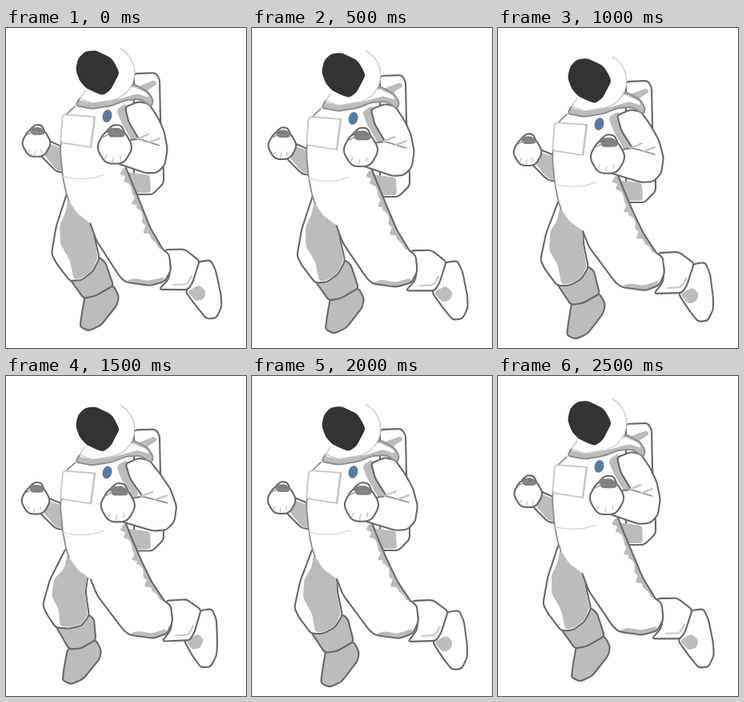
Animation, 300 px wide and 400 px high, one loop 3 s. Source, as an HTML page:

```html
<!DOCTYPE html>
<html lang="en">
<head>
<meta charset="utf-8">
<title>Running astronaut</title>
<style>
  html, body { margin: 0; width: 100%; height: 100%; overflow: hidden; background: #fff; }
  svg { display: block; width: 100%; height: 100%; }
  path { stroke-linejoin: round; stroke-linecap: round; }
</style>
</head>
<body>
<svg id="stage" viewBox="0 0 300 400"></svg>
<script>
const STEP = 500, REST = 2;
const WHITE = '#fff', SHADE = '#bcbcbc', INK = '#686868', SOFT = '#c6c6c6', MID = '#8c8c8c';

// The body sinks along an S-curve; the limbs swing with a late cubic.
const sink = k => 1 / (1 + Math.exp(-3.8 * (k - 1.25)));
const swing = k => (k / 3) ** 3;

const joint = (x, y, sinkX, sinkY, swingX = 0, swingY = 0) => ({ x, y, sinkX, sinkY, swingX, swingY });
const chest = joint(90, 140, 0, 10.6);
const hipL = joint(85, 232, 0, 10.6);
const hipR = joint(160, 210, 0, 10.6);
const shoulder = joint(165, 108, 0, 10.6);
const elbow = joint(207, 172, 3, 12, 9);
const fistL = joint(37, 155, -1, 12);
const fistR = joint(137, 161, 0, 13, 4);
const kneeL = joint(53, 290, -1, 10, -10, -6);
const cuffL = joint(74, 321, -1, 10, -17, -12);
const ankleL = joint(127, 333, -1, 12, -21, -4);
const toeL = joint(96, 389, 0, 13, -22, -6);
const innerL = joint(112, 296, 0, 12, -13);
const thighR = joint(170, 326, 5, 7, 0, -1);
const kneeR = joint(208, 297, 2, 4);
const ankleR = joint(245, 295, 4, 4, -2, -3);
const toeR = joint(260, 366, 2, 5, -9, -4);

const trunk = [chest, hipL, hipR, thighR, kneeR];
const thigh = [hipL, kneeL, innerL, cuffL];
const shin = [innerL, cuffL, ankleL];
const footL = [ankleL, toeL];
const shank = [kneeR, thighR, ankleR];
const footR = [ankleR, toeR];
const armL = [fistL, chest];
const armR = [shoulder, elbow, fistR];
const torso = [chest];

const P = text => text.split(' ').map(p => p.split(',').map(Number));

function oval(cx, cy, rx, ry, tilt = 0, from = 0, to = 360, bump = 0) {
  const pts = [], c = Math.cos(tilt), s = Math.sin(tilt);
  for (let deg = from; deg <= to - (to - from === 360 ? 15 : 0); deg += 15) {
    const a = deg * Math.PI / 180, r = 1 + bump * Math.cos(6 * a);
    const x = rx * r * Math.cos(a), y = ry * r * Math.sin(a);
    pts.push([cx + x * c - y * s, cy + x * s + y * c]);
  }
  return pts;
}

// Jagged cloth shadow on the inner side of an edge.
function creases(edge, depth) {
  const inner = [];
  for (let i = 0; i < edge.length - 1; i++) {
    const [a, b] = [edge[i], edge[i + 1]];
    const dx = b[0] - a[0], dy = b[1] - a[1], len = Math.hypot(dx, dy);
    for (let t = 0; t < 1; t += 5 / len) {
      const d = inner.length % 2 ? depth * (0.8 + 0.5 * Math.sin(inner.length * 2.3)) : depth * 0.45;
      inner.push([a[0] + dx * t - dy / len * d, a[1] + dy * t + dx / len * d]);
    }
  }
  return [...edge, ...inner.reverse()];
}

const parts = [];
function add(rig, pts, fill, stroke = 'none', width = 0, open = false) {
  const el = document.createElementNS('http://www.w3.org/2000/svg', 'path');
  el.setAttribute('fill', fill);
  el.setAttribute('stroke', stroke);
  el.setAttribute('stroke-width', width);
  stage.appendChild(el);
  parts.push({ el, rig, open, pts: typeof pts === 'string' ? P(pts) : pts });
}
const solid = (rig, pts, fill = WHITE) => add(rig, pts, fill, INK, 2.1);
const shade = (rig, pts, fill = SHADE) => add(rig, pts, fill);
const line = (rig, pts, color = INK, width = 2.1) => add(rig, pts, 'none', color, width, true);

function fist(hand, s) {
  const { x, y } = hand, at = (u, v) => [x + u * s, y + v * s], rig = [hand];
  solid(rig, [at(-9, -16), at(-1, -23), at(7, -22), at(11, -13), at(8, -6), at(-8, -6)]);
  solid(rig, oval(x, y, 17 * s, 17.5 * s, 0, 0, 360, 0.03));
  shade(rig, [at(-8, -19), at(5, -20), at(11, -14), at(9, -10), at(-6, -10)], '#808080');
  line(rig, [at(-12, -10), at(-5, -14), at(9, -13)], MID, 1.3);
  for (let i = -1; i < 2; i++) line(rig, [at(i * 7 - 1, 10 - i * i * 2), at(i * 8 - 2, 15 - i * i * 3)], SOFT, 1.4);
}

// Backpack
solid(torso, '160,67 187,66 192,74 193,122 197,190 197,204 183,218 160,218');
shade(torso, '162,84 186,75 189,80 176,88 184,100 166,94');
shade(torso, '150,190 180,194 181,216 160,216');

// Far arm and leg
solid(armL, '48,150 70,159 76,192 62,190 42,170');
shade(armL, '52,155 70,161 72,190 62,188 47,170');
fist(fistL, 1);
solid(footL, '92,344 127,332 134,345 132,356 112,382 97,389 86,384 88,368', SHADE);
solid(shin, '74,320 113,298 120,304 127,332 106,344 91,346', SHADE);
solid(thigh, '76,215 60,257 53,290 59,302 74,322 89,322 104,314 113,299 107,270 106,250');
shade(thigh, '78,220 74,240 65,255 64,278 75,297 79,320 89,320 103,313 111,298 106,270 105,250');

// Near lower leg
solid(footR, '226,333 244,295 259,293 265,307 269,337 269,352 262,366 250,367 239,353');
shade(footR, '228,333 243,324 251,332 248,342 238,345');
solid(shank, '200,281 226,280 245,294 236,322 230,331 195,332 206,318 208,300');
line(shank, '212,325 229,324 235,313', SOFT, 2);

// Torso and near thigh
const front = P('86,108 75,118 70,140 68,163 71,194 75,215 79,227 89,242 106,254');
const under = P('106,254 114,274 146,317 154,324 184,328 201,322 208,307 206,287 198,281');
const back = P('150,184 157,202 169,230 182,257 198,281');
shade(trunk, [...front, ...under, ...[...back].reverse(), [158, 110]], WHITE);
shade(trunk, creases(back, 9));
shade(trunk, '154,323 164,319 182,322 200,316 201,322 184,327');
line(trunk, front.slice(0, 7), MID, 1.8);
line(trunk, front.slice(6), SOFT, 1.3);
line(trunk, under);
line(trunk, back);
line(trunk, '70,195 85,198 105,198 122,193', '#d2d2d2', 1.2);

// Chest
shade(torso, '150,104 138,112 144,128 158,152 166,148', SHADE);
add(torso, '71,118 111,121 106,159 68,153', WHITE, SOFT, 1.8);
line(torso, '111,121 106,159', SOFT, 2.6);
shade(torso, oval(126.5, 120, 5.8, 8, 0.25), '#577ba3');

// Near arm
solid(armR, '149,109 166,102 179,105 191,122 201,140 207,162 204,182 194,192 179,193 140,181 154,152 168,150 154,128');
line(armR, '152,152 168,150 196,158', MID, 1.7);
line(armR, '166,150 180,144', SOFT, 2.4);
line(armR, '182,154 196,149', SOFT, 2.4);
fist(fistR, 1.22);

// Collar and head
add(torso, '92,97 87,107 108,111 132,107 150,100 168,99 182,108 184,100 178,90 160,80 140,92', SHADE, MID, 1.9);
shade(torso, '158,83 176,91 179,97 164,92 140,99 112,104', WHITE);
shade(torso, oval(125, 66, 36, 35), WHITE);
line(torso, oval(125, 66, 36, 35, 0, -60, 90), SOFT, 1.3);
shade(torso, '87,62 90,48 99,39 112,38 131,47 136,54 142,66 131,87 122,94 114,92 101,86 92,76', '#333');
shade(torso, '91,100 100,85 110,90 122,95 124,101 108,104', WHITE);
line(torso, '99,88 92,98 108,104 126,101', SOFT, 1.3);

// Moves a point with its joints, the nearest ones counting most.
function warp([x, y], rig, k) {
  const ds = sink(k) - sink(REST), dw = swing(k) - swing(REST);
  let sum = 0, dx = 0, dy = 0;
  for (const j of rig) {
    const w = 1 / ((x - j.x) ** 2 + (y - j.y) ** 2 + 1);
    sum += w;
    dx += w * (j.sinkX * ds + j.swingX * dw);
    dy += w * (j.sinkY * ds + j.swingY * dw);
  }
  return [x + dx / sum, y + dy / sum];
}

// Polyline with small rounded corners.
function trace(pts, open) {
  const n = pts.length;
  const toward = (a, b) => {
    const len = Math.hypot(b[0] - a[0], b[1] - a[1]) || 1;
    const t = Math.min(0.35, 4 / len);
    return [0, 1].map(i => (a[i] + (b[i] - a[i]) * t).toFixed(2)).join(' ');
  };
  const d = pts.map((p, i) => {
    const cmd = i ? 'L' : 'M';
    if (open && (i === 0 || i === n - 1)) return cmd + p.join(' ');
    return cmd + toward(p, pts[(i + n - 1) % n]) + 'Q' + p.join(' ') + ' ' + toward(p, pts[(i + 1) % n]);
  }).join('');
  return open ? d : d + 'Z';
}

let shown = -1;
function draw(time) {
  const k = 3 - Math.abs(3 - Math.floor(time / STEP) % 6);
  if (k === shown) return;
  shown = k;
  for (const { el, pts, open, rig } of parts) {
    el.setAttribute('d', trace(pts.map(p => warp(p, rig, k)), open));
  }
}

let start;
function tick(now) {
  start ??= now;
  draw(now - start);
  requestAnimationFrame(tick);
}
draw(0);
requestAnimationFrame(tick);
</script>
</body>
</html>
```
